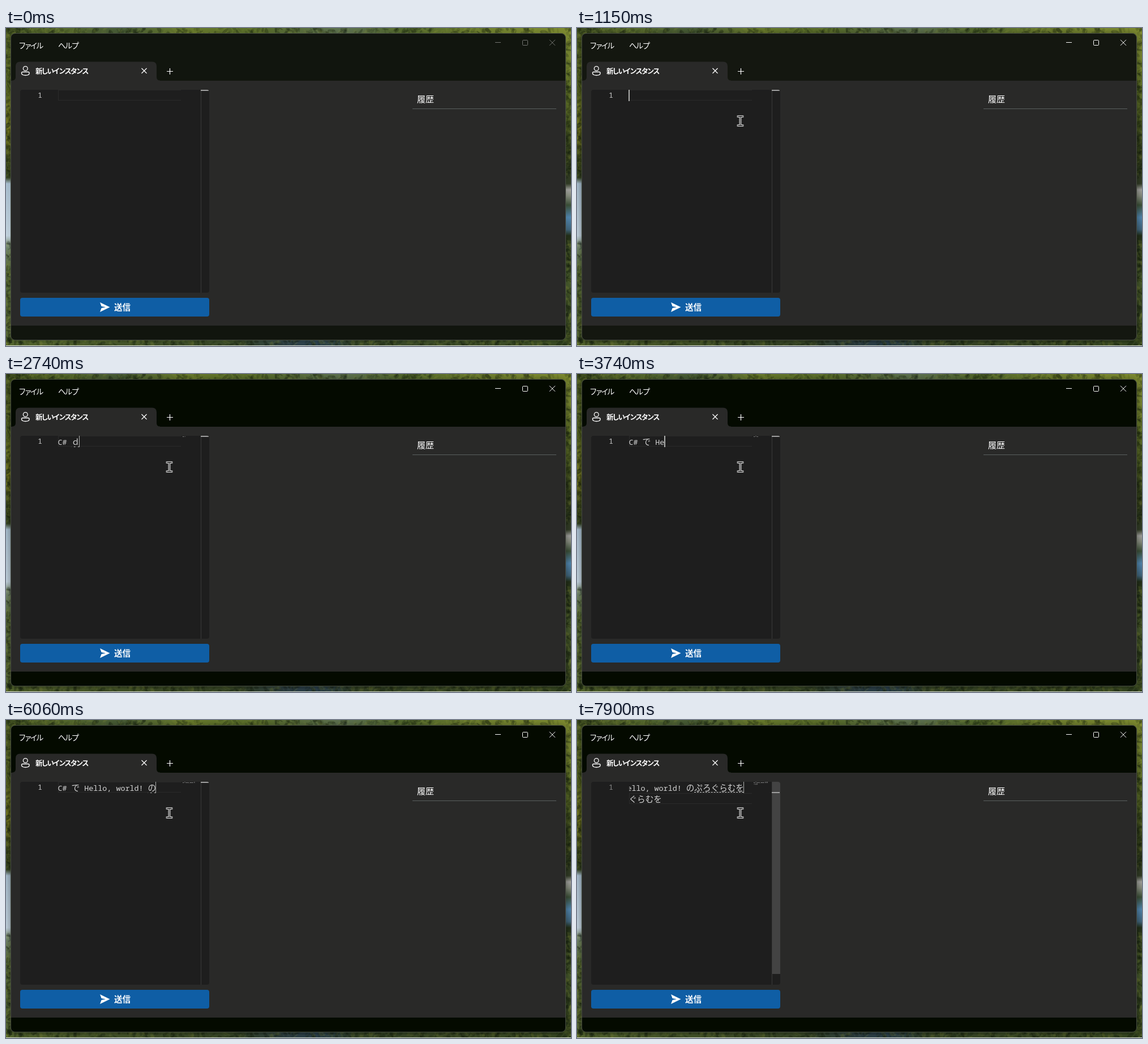
These frames come from a looping animation (998x561 px, 8 s). An HTML page with a canvas:

```html
<!DOCTYPE html>
<html lang="ja">
<head>
<meta charset="utf-8">
<title>新しいインスタンス</title>
<style>
  html, body { margin: 0; width: 100%; height: 100%; overflow: hidden; background: #2d3d1c; }
  body { position: relative; font-family: "Noto Sans CJK JP", "Noto Sans CJK", sans-serif; color: #fff; }
  .abs, body > *, .editor > * { position: absolute; }
  body > canvas { left: 0; top: 0; }

  .window {
    left: 8px; top: 9px; width: 979px; height: 540px;
    border: 1px solid #474d42; border-radius: 8px; overflow: hidden;
    background: #11150e;
    animation: mica 8s linear infinite, shade 8s step-end infinite;
  }
  @keyframes mica {
    0%, 1.624% { background-color: #11150e; }
    1.625%, 11.75% { background-color: #20201f; }
    14.375%, 15.99% { background-color: #141710; }
    16%, 100% { background-color: #040a00; }
  }
  @keyframes shade {
    0% { box-shadow: 0 2px 8px #0002; }
    11.75%, 100% { box-shadow: 0 2px 12px #0007; }
  }
  .panel { left: 0; top: 83px; width: 100%; height: 432px; background: #292928; }

  svg.ui { left: 0; top: 0; fill: none; stroke: #fff; }
  .caption { animation: focus 8s step-end infinite; }
  @keyframes focus {
    0% { stroke: #747572; }
    11.75%, 100% { stroke: #fff; }
  }

  .label { line-height: 20px; white-space: nowrap; }
  .editor {
    left: 25px; top: 109px; width: 334px; height: 358px;
    border-radius: 4px; background: #1e1e1e; overflow: hidden;
    font: 13.38px/19.5px "Noto Sans Mono", monospace; color: #d4d4d4;
  }
  .editor .num { left: 31px; top: 0; }
  .current {
    left: 66.5px; top: 0; width: 216px; height: 16.5px;
    border: solid #2a2a2a; border-width: 1.5px 0 1.5px 1.5px;
  }
  .row { left: 66.5px; height: 20px; width: 218px; overflow: hidden; white-space: pre; }
  .row.two { top: 19.5px; }
  .row span { line-height: 19px; }
  .row > span { position: absolute; left: 0; top: 0; }
  .w { font: 14.6px/19px "Noto Sans CJK JP", "Noto Sans CJK", sans-serif; }
  .comp { text-decoration: underline wavy 1px #d4d4d4; text-underline-offset: 2px; text-decoration-skip-ink: none; }
  .comp.dash { text-decoration-style: dashed; }
  .caret { top: 0; width: 2px; height: 20px; background: #aeafad; }
  .mini { left: 287px; top: 0; transform: scale(.125); transform-origin: 0 0; white-space: pre; line-height: 17px; color: #fff; font-weight: 700; }
  .rule { left: 319px; top: 0; width: 1px; height: 100%; background: #3a3a3a; }
  .slider { left: 320px; top: 0; width: 14px; height: 338.5px; background: #434343; }
  .mark { left: 319px; width: 14px; height: 2px; background: #a0a0a0; }

  .send { left: 25px; top: 476px; width: 334px; height: 33px; border-radius: 4px; background: #0f5ea5; }

  .pointer { left: 0; top: 0; overflow: visible; animation: glide 8s infinite; }
  @keyframes glide {
    0%, 2.375% { transform: translate(470px, 520px); animation-timing-function: ease-out; }
    10.875%, 100% { transform: translate(288.5px, 164px); }
  }
  .arrow { animation: arrow 8s step-end infinite; }
  .beam { animation: beam 8s step-end infinite; }
  @keyframes arrow { 0% { opacity: 0; } 2.375% { opacity: 1; } 6.25%, 100% { opacity: 0; } }
  @keyframes beam { 0% { opacity: 0; } 6.25%, 100% { opacity: 1; } }
</style>
</head>
<body>
<canvas id="scene" width="998" height="561"></canvas>
<div class="window"><div class="panel abs"></div></div>

<svg class="ui" width="998" height="561" stroke-width="1.2">
  <path d="M11 92.5Q17 92.5 17 86.5V67.5Q17 59.5 25 59.5H258Q266 59.5 266 67.5V86.5Q266 92.5 272 92.5V93H11Z" fill="#292928" stroke="none"/>
  <g stroke-width="1.3">
    <circle cx="34.3" cy="71.5" r="3.9"/>
    <path d="M29.8 77.5H38.8Q41.2 77.5 41.2 79.5C41.2 82.1 38 83.5 34.3 83.5S27.4 82.1 27.4 79.5Q27.4 77.5 29.8 77.5Z"/>
  </g>
  <path d="M239.5 71l9 9m0-9l-9 9M284 76.5h11m-5.5-5.5v11"/>
  <g class="caption" stroke-width="1">
    <path d="M864 25.5h10M960 20.8l10 10m0-10l-10 10"/>
    <rect x="912.5" y="21.5" width="9" height="9" rx="1"/>
  </g>
  <path d="M718 142.5h254" stroke="#5a5f5f" stroke-width="1"/>
</svg>

<div class="label" style="left:22px;top:20px;font-size:13.5px;letter-spacing:-3.2px">ファイル</div>
<div class="label" style="left:92px;top:20px;font-size:13.5px;letter-spacing:-1.8px">ヘルプ</div>
<div class="label" style="left:52px;top:66px;font-size:12.5px;font-weight:700;letter-spacing:-2.2px">新しいインスタンス</div>
<div class="label" style="left:726px;top:115px;font-size:15px">履歴</div>

<div class="editor">
  <div class="num" id="num">1</div>
  <div class="current" id="current"></div>
  <div class="row" id="first"><span></span></div>
  <div class="row two" id="second"><span></span></div>
  <div class="caret" id="caret"></div>
  <div class="mini" id="mini"></div>
  <div class="rule"></div>
  <div class="slider" id="slider"></div>
  <div class="mark" id="mark"></div>
</div>

<div class="send"></div>
<svg class="ui" width="998" height="561"><path d="M166 484L183.5 492.5L166 501L168.6 494L176 492.5L168.6 491Z" fill="#fff" stroke="none"/></svg>
<div class="label" style="left:191px;top:482px;font-size:14.6px;font-weight:700">送信</div>

<svg class="pointer" width="1" height="1">
  <path class="arrow" d="M0 0V16L3.8 12.4L6.3 18L8.7 17L6.2 11.5H11.4Z" fill="#fff" stroke="#000"/>
  <g class="beam" fill="none">
    <path d="M-5.5 -8H5.5M-5.5 8H5.5M0 -8V8" stroke="#fff" stroke-width="3.6"/>
    <path d="M-4.5 -8H4.5M-4.5 8H4.5M0 -8V8" stroke="#111" stroke-width="1.3"/>
  </g>
</svg>

<script>
const LOOP = 8000, HALF = 8.03, FULL = 14.6, LEFT = 66, VIEW = 203.5;
const text = "C# で Hello, world! の";

// [time, committed characters, text being composed]
const steps = [
  [0, 0], [1740, 1], [2140, 2], [2340, 3], [2740, 3, "ｄ"], [2940, 3, "で"], [3010, 4], [3340, 5],
  [3610, 6], [3740, 7], [3870, 8], [4000, 9], [4200, 10], [4400, 11], [4530, 12], [4600, 13],
  [4730, 14], [4800, 15], [5000, 16], [5200, 17], [5530, 18], [5730, 19],
  [5930, 19, "ｎ"], [6060, 19, "の"], [6320, 20],
  [6580, 20, "ｐ"], [6640, 20, "ぷ"], [6780, 20, "ぷｒ"], [6850, 20, "ぷろ"],
  [6980, 20, "ぷろｇ"], [7110, 20, "ぷろぐ"], [7230, 20, "ぷろぐｒ"], [7300, 20, "ぷろぐら"],
  [7430, 20, "ぷろぐらｍ"], [7630, 20, "ぷろぐらむ"], [7900, 20, "ぷろぐらむを"]
];

const $ = id => document.getElementById(id);
const isWide = c => c > "\u2fff";
const widthOf = s => [...s].reduce((sum, c) => sum + (isWide(c) ? FULL : HALF), 0);
const markup = s => s.replace(/[\u3000-\uffff]+/g, m => `<span class="w">${m}</span>`);

function show([time, count, comp = ""]) {
  const done = text.slice(0, count);
  const wrapped = comp.length > 2;
  const width = widthOf(done + comp);
  const shift = Math.min(0, VIEW - width);
  const rest = wrapped ? comp.slice(2) : "";
  const first = $("first").firstElementChild;

  first.innerHTML = markup(done) +
    (comp && `<span class="comp w${time >= 7900 ? " dash" : ""}">${comp}</span>`);
  first.style.left = shift + "px";
  $("second").firstElementChild.innerHTML = markup(rest);
  $("mini").innerHTML = markup(done + comp.slice(0, 2)) + "\n" + markup(rest);

  $("caret").style.left = LEFT + width + shift - (comp ? .5 : 0) + "px";
  $("caret").style.width = comp ? "1px" : "2px";
  $("current").style.top = wrapped ? "20px" : "0";
  $("num").style.color = wrapped ? "#858585" : "#c6c6c6";
  $("slider").style.display = wrapped ? "" : "none";
  $("mark").style.top = wrapped ? "18px" : "0";
}

let start = null, shown = null;
function frame(now) {
  start ??= now;
  const t = (now - start) % LOOP;
  const step = steps.findLast(s => s[0] <= t);
  if (step !== shown) show(shown = step);
  const lit = t >= 1010 && (t < 1540 || t >= 1740);
  $("caret").style.visibility = lit ? "visible" : "hidden";
  requestAnimationFrame(frame);
}

// Soft woodland backdrop: a strip of muted tones per edge, lightly dappled.
function paintScene() {
  const g = $("scene").getContext("2d");
  let seed = 7;
  const rnd = () => (seed = seed * 16807 % 2147483647) / 2147483647;
  const strip = (x, y, w, h, stops) => {
    const grad = w > h ? g.createLinearGradient(x, 0, x + w, 0) : g.createLinearGradient(0, y, 0, y + h);
    stops.split(" ").forEach(s => {
      const [at, color] = s.split(":");
      grad.addColorStop(+at, color);
    });
    g.fillStyle = grad;
    g.fillRect(x, y, w, h);
  };
  const leaf = (x, y) => {
    g.fillStyle = rnd() < .6 ? `rgba(18,28,12,${.08 + rnd() * .25})` : `rgba(140,150,60,${.04 + rnd() * .16})`;
    g.beginPath();
    g.ellipse(x, y, 2 + rnd() * 6, 1 + rnd() * 2.5, rnd() * 3, 0, 7);
    g.fill();
  };
  strip(0, 0, 998, 14, "0:#4a5a26 .1:#55682c .2:#465a35 .32:#687a2c .45:#566a2a .6:#5c7050 .7:#50662c .85:#6f7f2e 1:#7d8a30");
  strip(0, 546, 998, 15, "0:#56682f .2:#46572a .4:#3a4a28 .5:#2f4248 .56:#2c4350 .62:#364628 .8:#3f4f28 1:#384a22");
  strip(0, 10, 14, 540, "0:#4c5c24 .17:#4e5c20 .32:#74761f .42:#38441e .47:#33401f .49:#a9bfd0 .66:#c3d3df .7:#708468 .77:#55693a 1:#556634");
  strip(982, 10, 16, 540, "0:#7c8a32 .17:#5f7228 .28:#4b5a22 .41:#28341a .49:#323c26 .51:#a0a09c .53:#848a7c .56:#3c5038 .6:#5084ac .64:#40647a .66:#222e18 .78:#46582c 1:#3a4a24");
  for (let i = 0; i < 800; i++) {
    leaf(rnd() * 998, i % 2 ? rnd() * 11 : 549 + rnd() * 11);
    const y = rnd() * 560;
    if (y < 262 || y > 375) leaf(i % 2 ? rnd() * 9 : 988 + rnd() * 10, y);
  }
  g.fillStyle = "#dfe3dc";
  g.fillRect(0, 560, 998, 1);
}

paintScene();
show(steps[0]);
$("caret").style.visibility = "hidden";
requestAnimationFrame(frame);
</script>
</body>
</html>
```
